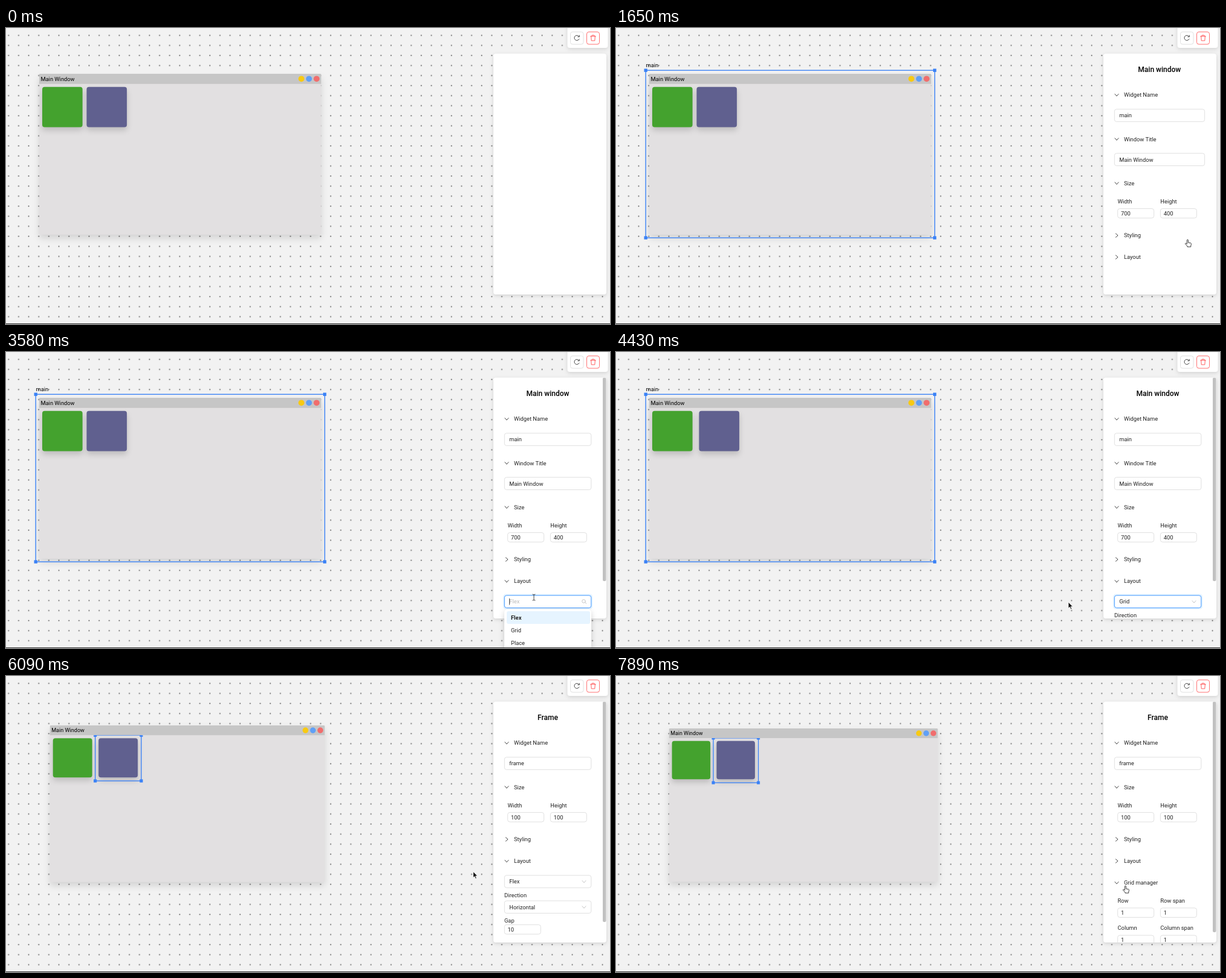
An HTML page for the animation above (8 s loop, 1000x491 px).

```html
<!DOCTYPE html>
<html lang="en">
<head>
<meta charset="utf-8">
<title>UI builder demo</title>
<style>
  html, body { margin: 0; width: 100%; height: 100%; overflow: hidden; background: #f2f2f2; }
  svg { display: block; width: 1000px; height: 491px; }
  text { font: 9.33px Roboto, sans-serif; fill: #222; white-space: pre; }
  .title { font-size: 12px; font-weight: 500; fill: #000; text-anchor: middle; }
  .strong { font-weight: 600; }
  .hint { fill: #bbb; }
  .window text { font-size: 14px; fill: #000; }
  .card { fill: #fff; filter: drop-shadow(0 2px 3px rgba(0, 0, 0, .13)); }
  .menu { fill: #fff; filter: drop-shadow(0 3px 5px rgba(0, 0, 0, .18)); }
  .body { fill: #e2e0e1; filter: drop-shadow(0 9px 9px rgba(0, 0, 0, .13)); }
  .tile { filter: drop-shadow(0 8px 7px rgba(0, 0, 0, .16)); }
  .box { fill: #fff; stroke: #d9d9d9; stroke-width: .8; }
  .focus { stroke: #4096ff; stroke-width: 1; }
  .glow { fill: none; stroke: rgba(5, 145, 255, .12); stroke-width: 2; }
  .line { fill: none; stroke: #333; stroke-width: .9; stroke-linecap: round; stroke-linejoin: round; }
  .pale { stroke: #bfbfbf; }
  .red { stroke: #ff4d4f; }
  .select { fill: none; stroke: #3b82f6; stroke-width: 2.1; }
  .handle { fill: #3b82f6; }
</style>
</head>
<body>
<svg viewBox="0 0 1000 491">
  <defs>
    <pattern id="dots" x="-4.1" y="3.9" width="16.667" height="16.667" patternUnits="userSpaceOnUse">
      <circle cx="8.333" cy="8.333" r=".95" fill="#505050"/>
    </pattern>
    <clipPath id="bodyClip"><rect y="25" width="700" height="375"/></clipPath>
    <clipPath id="panelClip"><rect x="807" y="42.5" width="187" height="399.5" rx="4"/></clipPath>
  </defs>
  <rect width="1000" height="491" fill="#f2f2f2"/>
  <rect width="1000" height="491" fill="url(#dots)"/>

  <g id="window" class="window">
    <rect class="body" width="700" height="400" rx="4"/>
    <path d="M0 25V2Q0 0 2 0H698Q700 0 700 2V25Z" fill="#c6c6c6"/>
    <text x="3.6" y="17.6">Main Window</text>
    <circle cx="651" cy="12.5" r="7.4" fill="#f8ca12"/>
    <circle cx="670" cy="12.5" r="7.4" fill="#60a0f6"/>
    <circle cx="688.8" cy="12.5" r="7.4" fill="#f16d6d"/>
    <rect class="tile" x="7.5" y="32.7" width="100" height="100" rx="6" fill="#44a22e"/>
    <rect id="frame" class="tile" y="32.7" width="100" height="100" rx="6" fill="#60608f"/>
    <g id="pickMain"></g>
    <g id="pickFrame" clip-path="url(#bodyClip)"></g>
  </g>

  <rect class="card" x="929.5" y="-6" width="67" height="39" rx="4"/>
  <rect class="box" x="934.5" y="6.5" width="21.5" height="20.5" rx="3.5"/>
  <path class="line" d="M948.5 13.8A4.2 4.2 0 1 0 949 18.2M949.3 12.2V14.7H946.8"/>
  <rect class="box red" x="961.5" y="6.5" width="21" height="20.5" rx="3.5"/>
  <path class="line red" d="M967.6 13.8H976.4M970 13.6V12H974V13.6M968.7 14L969.2 21H974.8L975.3 14"/>

  <rect class="card" x="807" y="42.5" width="187" height="399.5" rx="4"/>
  <g id="panel" clip-path="url(#panelClip)"></g>
  <g id="menu"></g>
  <rect y="490" width="1000" height="1" fill="#3a3a3a"/>
  <g id="cursor"></g>
</svg>

<script>
const LOOP = 8000;
const $ = id => document.getElementById(id);

// Screen updates come in bursts: first time, last time, count.
const BURSTS = [
  [100, 320, 3], [480, 910, 6], [1070, 1390, 5], [1560, 1750, 4], [1940, 2640, 9],
  [2820, 3100, 5], [3280, 3300, 2], [3440, 4130, 9], [4270, 4950, 8], [5200, 5690, 7],
  [6090, 6450, 5], [6590, 6930, 5], [7080, 7080, 1], [7430, 7540, 2], [7710, 7890, 4]
];

// Pointer path: time, x, y of the hot spot.
const PATH = [
  [100, 560, 470], [320, 430, 300], [480, 400, 275], [700, 330, 230], [1070, 330, 230],
  [1390, 900, 350], [1560, 946.5, 351], [1940, 946.5, 351], [2640, 841.5, 371],
  [2820, 841.5, 371], [3100, 858, 392], [3280, 874, 407], [3670, 874, 407],
  [3900, 848, 459], [4270, 848, 459], [4950, 155, 151], [5281, 155, 151],
  [5690, 773.5, 324.5], [6280, 773.5, 324.5], [6450, 800, 315], [6800, 843.5, 303],
  [6930, 843.5, 303], [7080, 843.5, 348]
];

const CURSORS = {
  arrow: '<path d="M0 0V10L2.3 7.9L4 11.8L5.6 11.1L4 7.3H7.1Z" fill="#111" stroke="#fff" stroke-width=".7"/>',
  hand: '<path d="M-1.2 1.1C-1.2-.3 .9-.3 .9 1.1V5L4.6 5.6C5.6 5.8 6 6.4 5.9 7.4L5.2 10.3V12H-.6V10.8L-3.9 7.3C-4.5 6.5-3.5 5.6-2.6 6.2L-1.2 7.3Z" fill="#fff" stroke="#222" stroke-width=".9"/>',
  beam: '<path class="line" d="M-2-5Q0-5 0-4Q0-5 2-5M0-4V4M-2 5Q0 5 0 4Q0 5 2 5"/>'
};

function snap(t) {
  let s = 0;
  for (const [a, b, n] of BURSTS) {
    if (t < a) break;
    const gap = n > 1 ? (b - a) / (n - 1) : 1;
    s = a + Math.min(n - 1, Math.floor((t - a) / gap + 1e-6)) * gap;
  }
  return s;
}

function pointer(t) {
  const i = PATH.findIndex(p => p[0] > t);
  if (i < 0) return PATH[PATH.length - 1].slice(1);
  const [a, x, y] = PATH[i - 1], [b, x2, y2] = PATH[i];
  const k = (t - a) / (b - a);
  return [x + (x2 - x) * k, y + (y2 - y) * k];
}

const text = (x, y, str, cls = '') => `<text x="${x}" y="${y + 3.3}" class="${cls}">${str}</text>`;

const box = (x, y, w, h, cls = '') =>
  `<rect class="${cls}" x="${x}" y="${y - h / 2}" width="${w}" height="${h}" rx="3.5"/>`;

const input = (y, w, str) => box(825.3, y, w, 20.6, 'box') + text(833.3, y, str);
const small = (x, y, str) => box(x, y, 60, 15.6, 'box') + text(x + 5.3, y, str);

const header = (y, str, open) =>
  `<path class="line" d="${open ? `M826 ${y - 1.5}L829 ${y + 2}L832 ${y - 1.5}` : `M827.3 ${y - 3.2}L831 ${y}L827.3 ${y + 3.2}`}"/>`
  + text(841, y, str);

const pair = (y, a, b, value, value2 = value) =>
  text(830.5, y, a) + text(901.3, y, b) + small(830.6, y + 20, value) + small(901.4, y + 20, value2);

function dropdown(y, w, str, focus, searching) {
  const right = 825 + w - 11.5;
  return (focus ? box(824, y, w + 2.6, 23, 'glow') : '')
    + box(825.3, y, w, 20.6, focus ? 'box focus' : 'box')
    + text(833.3, y, str, searching ? 'hint' : '')
    + (searching
      ? `<path class="line" d="M833.6 ${y - 5}V${y + 5}"/><path class="line pale" d="M${right + 1.8} ${y + 1.2}L${right + 3.8} ${y + 3.4}M${right + 2.3} ${y - .7}a2.8 2.8 0 1 0-5.6 0a2.8 2.8 0 1 0 5.6 0"/>`
      : `<path class="line pale" d="M${right - 3} ${y - 1.5}L${right} ${y + 2}L${right + 3} ${y - 1.5}"/>`);
}

const layoutBody = (y, w, kind, focus, searching) =>
  dropdown(y + 34, w, kind, focus, searching)
  + text(825, y + 56.3, 'Direction') + dropdown(y + 76.3, w, 'Horizontal')
  + text(825, y + 99, 'Gap') + small(825.3, y + 113.5, '10');

function panel(s) {
  if (s < 730) return '';
  const isFrame = s >= 5250;
  const layoutOpen = s >= 2820 && s < 6840;
  const gridOpen = s >= 7430;
  const thumb = gridOpen ? 382.5 : !layoutOpen || s < 2880 ? 0 : isFrame ? 365.5 : 337.5;
  const w = thumb ? 143.5 : 149.3;

  let y = 111;
  let out = `<text class="title" x="${thumb ? 897 : 899.8}" y="73.2">${s >= 5200 ? 'Frame' : 'Main window'}</text>`
    + header(y, 'Widget Name', true) + input(y + 34, w, isFrame ? 'frame' : 'main');
  y += 73.2;
  if (!isFrame) {
    out += header(y, 'Window Title', true) + input(y + 34, w, 'Main Window');
    y += 73.2;
  }
  out += header(y, 'Size', true)
    + (isFrame ? pair(y + 30, 'Width', 'Height', 100) : pair(y + 30, 'Width', 'Height', 700, 400));
  y += 86.7;
  out += header(y, 'Styling', false);
  y += 36;
  out += header(y, 'Layout', layoutOpen);
  if (layoutOpen) {
    const picked = !isFrame && s >= 4270;
    const searching = s >= 3280 && s < 4270;
    const shown = Math.min(1, (s - 2750) / 210);
    out += `<g opacity="${shown}">${layoutBody(y, w, picked ? 'Grid' : 'Flex', !isFrame && s >= 3280, searching)}</g>`;
  }
  if (isFrame) {
    y += layoutOpen ? 149 : 36;
    out += header(y, 'Grid manager', gridOpen);
    if (gridOpen) out += pair(y + 29.7, 'Row', 'Row span', 1) + pair(y + 75, 'Column', 'Column span', 1);
  }
  if (thumb) out += `<rect x="988" y="42.5" width="5.5" height="${thumb}" rx="2" fill="#c1c1c1"/>`;
  return out;
}

function menu(s) {
  if (s < 3280 || s >= 4270) return '';
  return '<rect class="menu" x="825" y="427" width="144" height="80" rx="5"/>'
    + '<rect x="829" y="430" width="138" height="21" rx="3" fill="#e6f4ff"/>'
    + (s > 3850 ? '<rect x="829" y="451.5" width="138" height="21" rx="3" fill="#f5f5f5"/>' : '')
    + text(836, 440.5, 'Flex', 'strong') + text(836, 462, 'Grid') + text(836, 483, 'Place');
}

function outline(x, y, x2, y2) {
  const corners = [[x, y], [x2, y], [x, y2], [x2, y2]];
  return `<rect class="select" x="${x}" y="${y}" width="${x2 - x}" height="${y2 - y}"/>`
    + corners.map(([cx, cy]) => `<rect class="handle" x="${cx - 4}" y="${cy - 4}" width="8" height="8"/>`).join('');
}

function cursor(s) {
  if (s < 100) return '';
  const [x, y] = pointer(s);
  const inWindow = x > 55 && x < 522 && y > 76 && y < 342;
  const kind = s >= 3200 && s < 3700 ? 'beam' : inWindow || x > 807 ? 'hand' : 'arrow';
  return `<g transform="translate(${x} ${y})">${CURSORS[kind]}</g>`;
}

$('pickMain').innerHTML = outline(-8.7, -8.7, 709, 408) + '<text x="-8.2" y="-16.8">main</text>';
$('pickFrame').innerHTML = outline(115.2, 25, 232.6, 141.6);

function draw(s) {
  // Wheel zoom around a fixed point
  const zoom = s < 6090 ? 1 : s < 6200 ? .9745 : .953;
  const left = 755 - 700 * zoom, top = 311 - 235 * zoom;
  $('window').setAttribute('transform', `translate(${left} ${top}) scale(${zoom * 2 / 3})`);
  $('frame').setAttribute('x', s < 4270 ? 117.7 : 123.7);
  $('pickMain').style.display = s >= 730 && s < 5200 ? '' : 'none';
  $('pickFrame').style.display = s >= 5200 ? '' : 'none';
  $('panel').innerHTML = panel(s);
  $('menu').innerHTML = menu(s);
  $('cursor').innerHTML = cursor(s);
}

const start = performance.now();
let last = -1;
function tick() {
  const s = snap((performance.now() - start) % LOOP);
  if (s !== last) draw(last = s);
  requestAnimationFrame(tick);
}
tick();
</script>
</body>
</html>
```
